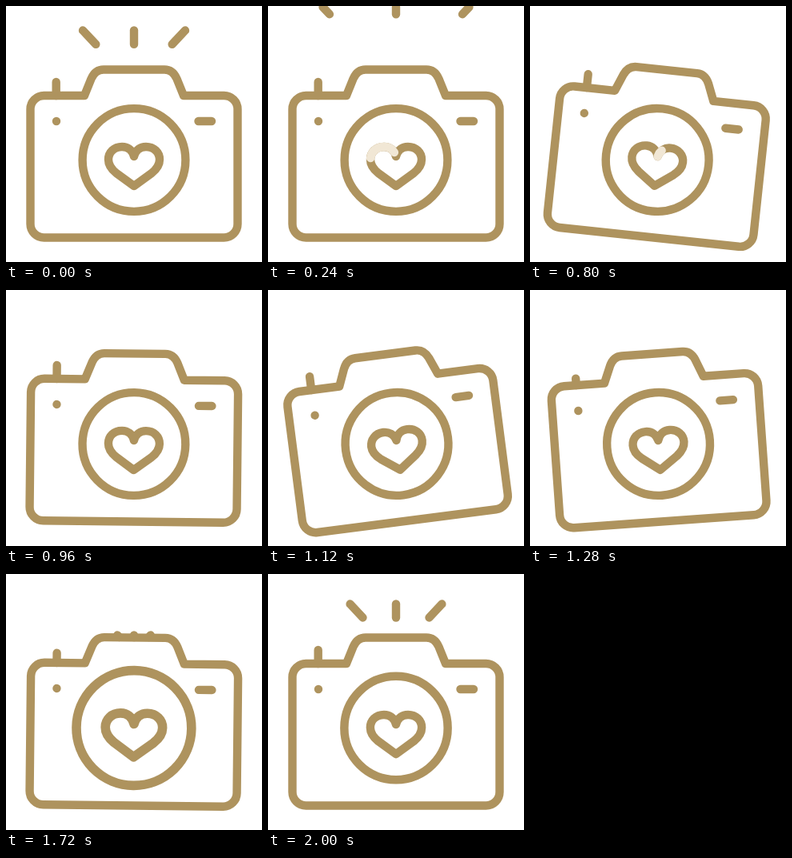
Write an HTML page that moves like this. It is 320 px wide and 320 px high and loops after 2040 ms.

```html
<!DOCTYPE html>
<html lang="en">
<head>
<meta charset="utf-8">
<title>Camera</title>
<style>
  html, body { margin: 0; width: 100%; height: 100%; overflow: hidden; background: #fff; }
  svg { display: block; width: 100vw; height: 100vh; }
  .ink { fill: none; stroke: #ae935e; stroke-width: 10.4; stroke-linecap: round; stroke-linejoin: round; }
  .shine { stroke: #f1e7d5; }
</style>
</head>
<body>
<svg viewBox="0 0 320 320" class="ink">
  <defs>
    <path id="heart" pathLength="100" d="M160 188C158 180 152 176 145 176C135 176 128 183 128 192C128 200 133 205 138 209L160 225L182 209C187 205 192 200 192 192C192 183 185 176 175 176C168 176 162 180 160 188"/>
  </defs>
  <path class="ray" pathLength="100" d="M141.6 79L67.3 0"/>
  <path class="ray" pathLength="100" d="M160 79V0"/>
  <path class="ray" pathLength="100" d="M178.4 79L252.7 0"/>
  <g id="camera">
    <line id="button" x1="62.7" y1="95" x2="62.7" y2="112"/>
    <path d="M98 112H47.5a17 17 0 0 0-17 17V272.5a17 17 0 0 0 17 17H272.5a17 17 0 0 0 17-17V129a17 17 0 0 0-17-17H222L213.5 91Q208.5 79.5 198 79.5H122Q111.5 79.5 106.5 91Z"/>
    <path d="M63 144h.01M240.5 144H257"/>
    <g id="lens">
      <circle cx="160" cy="192.5" r="64.4"/>
      <use href="#heart"/>
      <use href="#heart" class="shine" id="shine"/>
    </g>
  </g>
</svg>
<script>
  const LOOP = 2040;
  const $ = id => document.getElementById(id);
  const rays = document.querySelectorAll('.ray');

  const ease = (t, from, to) => {
    const u = Math.min(1, Math.max(0, (t - from) / (to - from)));
    return (1 - Math.cos(Math.PI * u)) / 2;
  };

  // keys: [time, value] pairs joined by sine easing
  const track = (t, keys) => keys.slice(1).reduce(
    (v, [time, value], i) => v + (value - keys[i][1]) * ease(t, keys[i][0], time), keys[0][1]);

  // shows only the part of a path between tail and head (0 to 1)
  function trim(el, tail, head) {
    const length = (head - tail) * 100;
    el.style.visibility = length > 0.01 ? 'visible' : 'hidden';
    el.style.strokeDasharray = `${Math.max(0, length)} 200`;
    el.style.strokeDashoffset = -tail * 100;
  }

  function draw(t) {
    const angle = track(t, [[540, 0], [815, 6.1], [1150, -7.6], [1520, 5], [1780, 0]]);
    $('camera').setAttribute('transform', `rotate(${angle} 160 184.5)`);

    const scale = track(t, [[1360, 1], [1710, 1.117], [2040, 1]]);
    $('lens').setAttribute('transform', `translate(160 192.5) scale(${scale}) translate(-160 -192.5)`);

    $('button').setAttribute('y1', track(t, [[1140, 95], [1420, 112], [1500, 112], [1840, 95]]));

    trim($('shine'), ease(t, 160, 905), ease(t, 40, 660));

    // the flash runs across the loop seam
    const flash = t > LOOP / 2 ? t - LOOP : t;
    rays.forEach(ray => trim(ray, ease(flash, -310, 410), ease(flash, -400, 300)));
  }

  const start = performance.now();
  function tick() {
    draw((performance.now() - start) % LOOP);
    requestAnimationFrame(tick);
  }
  tick();
</script>
</body>
</html>
```
